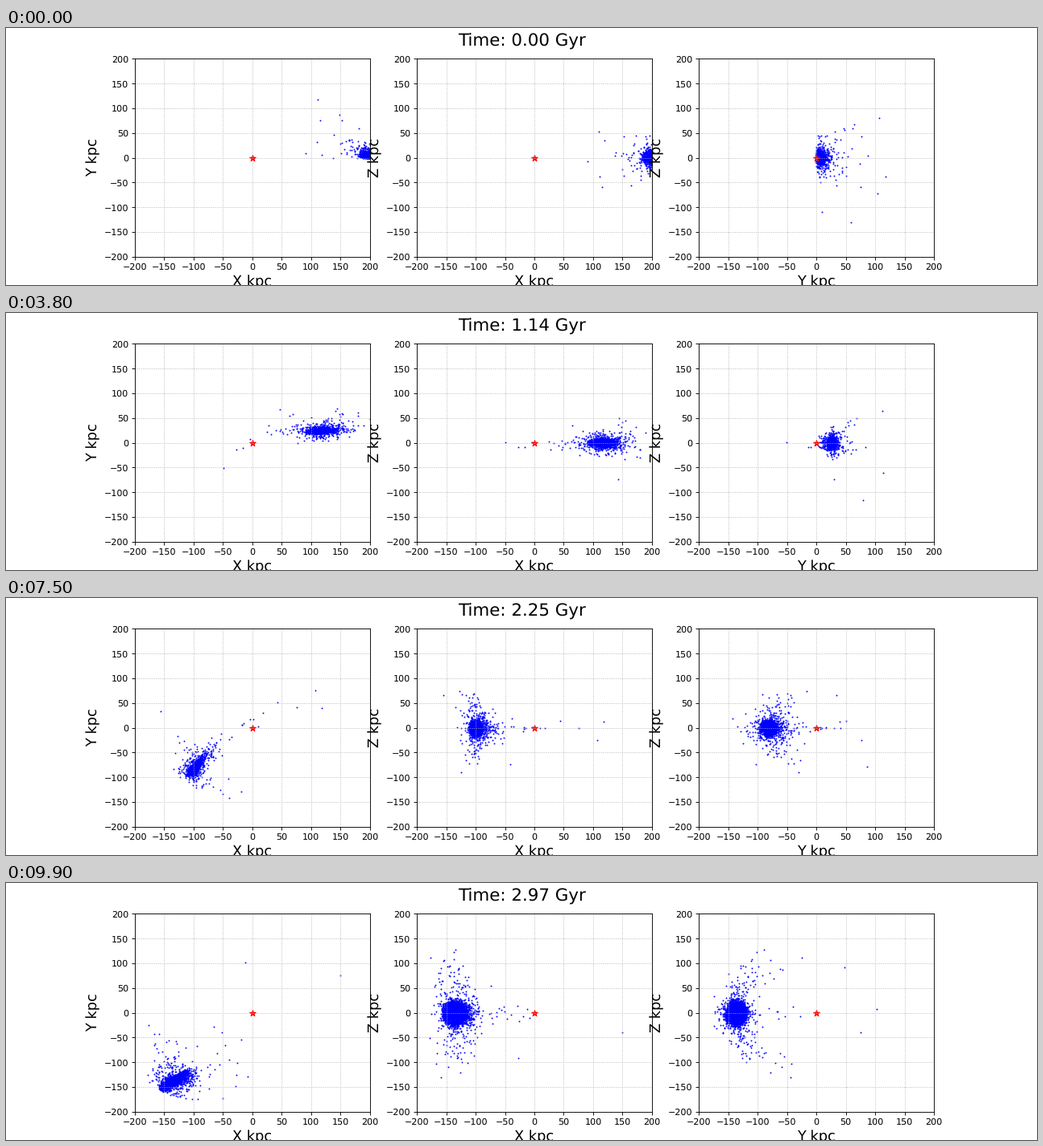
These frames come from a looping animation (1280x320 px, 10000 ms). A matplotlib script:

```python
import numpy as np
import matplotlib.pyplot as plt
from matplotlib.animation import FuncAnimation

FRAMES = 100
STEP_GYR = 0.03
SUBSTEPS = 30
COUNT = 2100
HOT_COUNT = 240     # loosely bound particles with a wide velocity spread
V_CIRC = 154.5      # kpc/Gyr, flat rotation curve of the host
KICK_FRAME = 60     # just after the pericentre passage

plt.rcParams.update({
    "font.family": "DejaVu Sans",
    "font.size": 16,
    "xtick.labelsize": 10,
    "ytick.labelsize": 10,
    "text.hinting": "none",
})


def directions(rng, n):
    v = rng.normal(size=(n, 3))
    return v / np.linalg.norm(v, axis=1, keepdims=True)


def make_satellite(rng):
    """Plummer sphere starting at x = 200 with a small tangential speed."""
    u = rng.uniform(0.001, 0.9995, COUNT)
    radius = 5.5 / np.sqrt(u ** (-2 / 3) - 1)
    pos = directions(rng, COUNT) * radius[:, None] * [1.2, 1, 1]
    pos[:, 1] = np.abs(pos[:, 1])
    pos[:, 0] += 200

    ball = directions(rng, COUNT) * rng.uniform(0, 1, (COUNT, 1)) ** (1 / 3)
    vel = np.zeros((COUNT, 3))
    vel[:, 1] = 22 + 2.5 * ball[:, 1]
    vel[:, 2] = 4.3 * ball[:, 2]
    vel[:HOT_COUNT] += rng.normal(0, 9, (HOT_COUNT, 3))
    energy_kick = 0.225 * V_CIRC ** 2 * ball[:, 0]
    return pos, vel, energy_kick


def acceleration(pos):
    r2 = np.einsum("ij,ij->i", pos, pos) + 0.3
    return -V_CIRC ** 2 * pos / r2[:, None]


def simulate():
    """Leapfrog in a logarithmic potential, one snapshot per frame."""
    pos, vel, kick = make_satellite(np.random.default_rng(12))
    dt = STEP_GYR / SUBSTEPS
    shots = []
    for frame in range(FRAMES):
        shots.append(pos.copy())
        if frame == KICK_FRAME:
            v2 = np.einsum("ij,ij->i", vel, vel)
            scale = np.sqrt(np.maximum(1 + 2 * kick / v2, 0.3))
            vel *= np.minimum(scale, 1.5)[:, None]
        for _ in range(SUBSTEPS):
            vel += acceleration(pos) * dt / 2
            pos += vel * dt
            vel += acceleration(pos) * dt / 2
    return shots


snapshots = simulate()
fig, axes = plt.subplots(1, 3, figsize=(16, 4), dpi=80)
title = fig.suptitle("Time: 0.00 Gyr")
planes = [(0, 1), (0, 2), (1, 2)]
ticks = np.arange(-200, 201, 50)
clouds = []

for ax, (a, b) in zip(axes, planes):
    clouds.append(ax.scatter(*snapshots[0][:, [a, b]].T, s=2, marker=".", c="blue"))
    ax.scatter(0, 0, s=50, marker="*", c="red")
    ax.set(xlim=(-200, 200), ylim=(-200, 200), xticks=ticks, yticks=ticks,
           xlabel="XYZ"[a] + " kpc", ylabel="XYZ"[b] + " kpc")
    ax.grid(linestyle=":")


def update(frame):
    for cloud, plane in zip(clouds, planes):
        cloud.set_offsets(snapshots[frame][:, plane])
    title.set_text(f"Time: {frame * STEP_GYR:.2f} Gyr")
    return [*clouds, title]


anim = FuncAnimation(fig, update, frames=FRAMES, interval=100, repeat=True)
plt.show()
```
